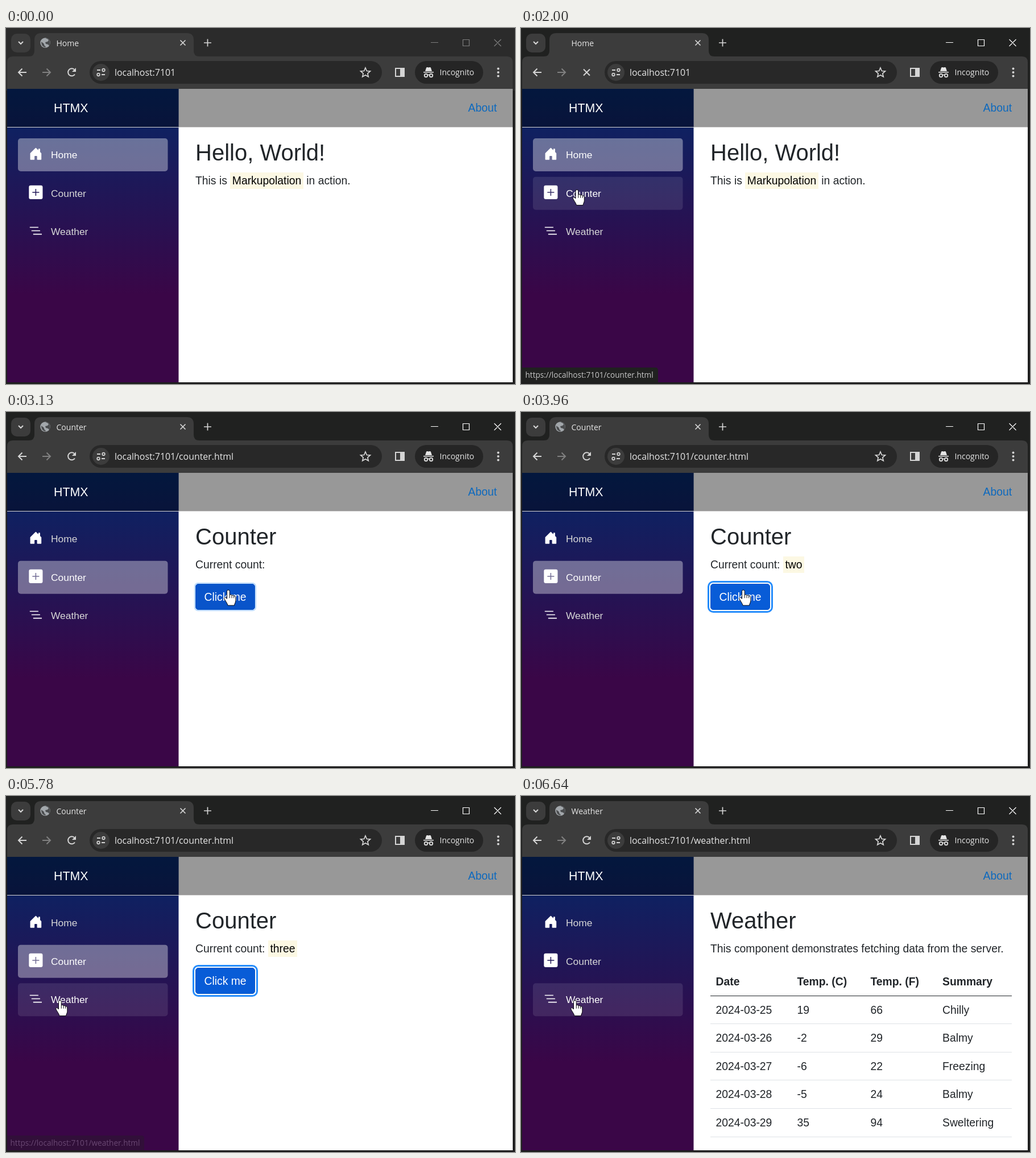
Recreate the animation shown at these times as an HTML page. Size 895 by 626 pixels, loop 8100 ms.

```html
<!DOCTYPE html>
<html lang="en">
<head>
<meta charset="utf-8">
<title>Browser demo</title>
<style>
html, body { margin: 0; width: 100%; height: 100%; overflow: hidden; background: #1e1e1e; }
#stage { position: absolute; left: 0; top: 0; width: 895px; height: 626px; overflow: hidden;
  font: 19.33px/29px "Liberation Sans", Arial, sans-serif; color: #212529; }
svg { position: absolute; left: 0; top: 0; }
.ui { font-family: "Open Sans", "Noto Sans", sans-serif; font-size: 14px; fill: #e6e6e6; }
.line { fill: none; stroke: #d5d5d5; stroke-width: 2; }
.thin { stroke-width: 1.7; }
.page { position: absolute; left: 333px; top: 195px; width: 530px; }
h1 { margin: 0 0 11px; font-weight: 400; font-size: 40px; line-height: 48px; }
p { margin: 0 0 19px; white-space: pre; }
mark { background: #fcf8e3; color: #000; padding: .1875em; }
#btn { display: inline-block; box-sizing: border-box; height: 46px; padding: 8px 14.5px;
  border: 1px solid; border-radius: 5px; color: #fff; white-space: pre; }
.row { position: relative; height: 48.6px; border-bottom: 1px solid #dee2e6; }
.row:first-child { border-color: #212529; font-weight: 700; }
.row span { position: absolute; top: 10px; white-space: pre; }
</style>
</head>
<body>
<div id="stage">
<svg width="895" height="626">
  <defs>
    <linearGradient id="side" x2="0" y2="1">
      <stop stop-color="#052767"/><stop offset=".7" stop-color="#3a0647"/>
    </linearGradient>
  </defs>
  <rect id="title" width="895" height="110"/>

  <!-- tab strip -->
  <rect x="9" y="10" width="34" height="33" rx="10" fill="#3c3c3c"/>
  <path d="M22 24l4 4 4-4" class="line"/>
  <path d="M40 50q10 0 10-10V21q0-12 12-12H318q12 0 12 12V40q0 10 10 10z" fill="#3c3c3c"/>
  <g id="globe">
    <circle cx="69" cy="26" r="8.7" fill="#a2a7ab"/>
    <path d="M62 24l5 4v2l3 3-1 1q-7-1-7-10zM69 19h4l2 3-2 2-4 1 1 3 4 1 2 2q3-5 0-10l-3-3z" fill="#4a4c4e"/>
  </g>
  <text id="tabText" class="ui" x="88.5" y="32"/>
  <path d="M306.5 21.5l9 9m0-9l-9 9M348 26h13M354.5 19.5v13" class="line thin"/>
  <path id="winBtns" d="M747 25.5h13M803.5 20.5h11v11h-11zM858.5 20l12 12m0-12l-12 12" fill="none" stroke-width="1.2"/>

  <!-- toolbar -->
  <path d="M2 107V60q0-10 10-10H881q10 0 10 10V107z" fill="#3c3c3c"/>
  <path d="M36 78H22m6.5-6.5L22 78l6.5 6.5" class="line"/>
  <path d="M64 78h14m-6.5-6.5L78 78l-6.5 6.5" class="line" style="stroke:#808080"/>
  <g id="reload">
    <path d="M121 81.5a6.5 6.5 0 1 1-1-8.5" class="line"/><path d="M123 70v7h-7z" fill="#d5d5d5"/>
  </g>
  <path id="stop" d="M110 72.5l11 11m0-11l-11 11" class="line"/>
  <rect x="147" y="58" width="514" height="40" rx="20" fill="#282828"/>
  <circle cx="167" cy="78" r="15" fill="#3c3c3c"/>
  <path d="M160 74h6M168 82h6" class="line"/>
  <circle cx="171.5" cy="74" r="2.3" class="line thin"/>
  <circle cx="162.5" cy="82" r="2.3" class="line thin"/>
  <text id="url" class="ui" x="191" y="83.5" style="font-size:15.9px"/>
  <path d="M632 70l2.4 5.5 6 .5-4.6 4 1.4 5.8-5.2-3.1-5.2 3.1 1.4-5.8-4.6-4 6-.5z" class="line thin"/>
  <path d="M685 71h15v14h-15z" class="line"/><path d="M693 71h7v14h-7z" fill="#d5d5d5"/>
  <rect x="719" y="58" width="120" height="40" rx="20" fill="#252525"/>
  <path d="M737 76l2-6q.5-1.500 2-1l2 .6 2-.6q1.500-.5 2 1l2 6zM734 77h18v1.600h-18z" fill="#e6e6e6"/>
  <path d="M741 83q2-1.500 4 0" class="line thin"/>
  <circle cx="738.5" cy="83.5" r="2.7" class="line"/><circle cx="747.5" cy="83.5" r="2.7" class="line"/>
  <text class="ui" x="762.5" y="83">Incognito</text>
  <g fill="#d5d5d5"><circle cx="865.5" cy="71.5" r="2"/><circle cx="865.5" cy="78" r="2"/><circle cx="865.5" cy="84.5" r="2"/></g>

  <!-- page frame -->
  <path d="M303 107H891V623H303z" fill="#fff"/>
  <path d="M303 107H891V174H303z" fill="#989898"/>
  <path d="M2 107H303.5V623H2z" fill="url(#side)"/>
  <path d="M2 107H303.5V174H2z" fill="#000" fill-opacity=".4"/>
  <path d="M2 174.5H891" stroke="#d6d5d5"/>
  <text x="84" y="148" font-size="21.3" fill="#fff">HTMX</text>
  <text x="812.5" y="147" fill="#0d69be">About</text>
  <g id="nav" font-size="17.4"></g>
  <g id="status">
    <path id="statusBox" fill="#202120"/>
    <text id="statusText" class="ui" x="7.5" y="615" style="font-size:13.6px;fill:#c7c7c7"/>
  </g>
</svg>

<div class="page" id="home"><h1>Hello, World!</h1><p>This is <mark>Markupolation</mark> in action.</p></div>
<div class="page" id="counter"><h1>Counter</h1><p>Current count: <mark id="count"></mark></p><div id="btn">Click me</div></div>
<div class="page" id="weather"><h1>Weather</h1><p>This component demonstrates fetching data from the server.</p><div id="table"></div></div>

<svg width="895" height="626">
  <g id="cursor" fill="#fff" stroke="#000" stroke-linejoin="round">
    <path id="arrow" d="M0 0V22.5L5 17.7 8.6 25.6 12.4 24 9 16.5H16Z"/>
    <g id="hand" transform="scale(.95)">
      <path d="M-2.6 16V2.4a2.5 2.5 0 0 1 5 0V9.5a2.2 2.2 0 0 1 4 .8 2.2 2.2 0 0 1 3.8 1 2.2 2.2 0 0 1 3.3 1.8V20c0 3-2 5-2.5 8.5H-1C-1.5 25-6.5 19-7.5 16c-.6-2.2 2-3 3.2-1.2z"/>
      <path d="M2.4 9.5v5.5M6.4 10.3v4.7M10.2 11.3v3.7" fill="none"/>
    </g>
  </g>
</svg>
</div>

<script>
const $ = id => document.getElementById(id);
const LOOP = 8100, STEP = 67.65;
const names = ["Home", "Counter", "Weather"];
const urls = ["", "/counter.html", "/weather.html"];
const pages = ["home", "counter", "weather"];
const icons = [
  "M6.5 14.5v-3.5q0-.5.5-.5h2q.5 0 .5.5v3.5a.5.5 0 0 0 .5.5h4a.5.5 0 0 0 .5-.5v-7a.5.5 0 0 0-.15-.35L13 5.8V2.5a.5.5 0 0 0-.5-.5h-1a.5.5 0 0 0-.5.5v1.3L8.35 1.15a.5.5 0 0 0-.7 0l-6 6a.5.5 0 0 0-.15.35v7a.5.5 0 0 0 .5.5h4a.5.5 0 0 0 .5-.5z",
  "M2 0H14a2 2 0 0 1 2 2V14a2 2 0 0 1-2 2H2a2 2 0 0 1-2-2V2a2 2 0 0 1 2-2zM7.5 4v3.5H4v1h3.5V12h1V8.5H12v-1H8.5V4z",
  "M1 3.5H11v1H1zM3 7.5H13v1H3zM5 11.5H15v1H5z"
];
$("nav").innerHTML = names.map((name, i) => `<g transform="translate(0 ${i * STEP})">
  <rect x="21" y="194" width="263.5" height="58" rx="5" fill="#fff"/>
  <path transform="translate(40.3 209.2) scale(1.51)" fill="#fff" fill-rule="evenodd" d="${icons[i]}"/>
  <text x="79" y="229">${name}</text></g>`).join("");
const rows = [...$("nav").children];

const forecast = `Date|Temp. (C)|Temp. (F)|Summary
2024-03-25|19|66|Chilly
2024-03-26|-2|29|Balmy
2024-03-27|-6|22|Freezing
2024-03-28|-5|24|Balmy
2024-03-29|35|94|Sweltering`;
const columns = [9.5, 152.5, 281.5, 408];
$("table").innerHTML = forecast.split("\n").map(line => `<div class="row">${
  line.split("|").map((cell, i) => `<span style="left:${columns[i]}px">${cell}</span>`).join("")}</div>`).join("");

// Pointer stops: time, x, y
const stops = [[960, -12, 342], [1320, 98.5, 284.5], [2200, 98.5, 284.5], [2500, 374, 308],
  [2630, 391, 313], [5160, 391, 313], [5700, 95, 359.5], [LOOP, 95, 359.5]];
const clicks = [3070, 3710, 4210];

const ramp = (t, start, end) => Math.max(0, Math.min(1, (t - start) / (end - start)));
const mix = (a, b, k) => a + (b - a) * k;
const mixRgb = (a, b, k) => `rgb(${a.map((v, i) => Math.round(mix(v, b[i], k)))})`;
const show = (id, on) => $(id).style.display = on ? "" : "none";
const text = (id, value) => { if ($(id).textContent !== value) $(id).textContent = value; };

function pointer(t) {
  const i = Math.max(1, stops.findIndex(s => s[0] > t));
  const [a, b] = [stops[i - 1], stops[i]];
  const u = ramp(t, a[0], b[0]), k = u * u * (3 - 2 * u);
  return [mix(a[1], b[1], k), mix(a[2], b[2], k)];
}

function rowAlpha(i, t, page, hover) {
  if (page === 1 && i === 1) return mix(.1, .37, ramp(t, 2390, 2590));
  if (page === 2 && i === 2) return mix(.37, .1, ramp(t, 6410, 6600));
  if (i === page) return .37;
  return hover === i && t >= 1860 ? .1 : 0;
}

function drawButton(t) {
  const press = Math.max(...clicks.map(c => ramp(t, c, c + 90) * (1 - ramp(t, c + 110, c + 240))));
  const over = ramp(t, 2490, 2640), focus = ramp(t, 3070, 3220);
  const base = [27, 110, 194].map((v, i) => mix(v, [8, 92, 215][i], over));
  $("btn").style.background = mixRgb(base, [10, 80, 196], press);
  $("btn").style.borderColor = mixRgb([24, 97, 172], [10, 88, 202], over);
  $("btn").style.boxShadow = `0 0 0 ${2 * focus}px #fff, 0 0 0 ${5 * focus}px rgba(37,140,251,${focus})`;
}

function draw(t) {
  const page = t < 2130 ? 0 : t < 6100 ? 1 : 2;
  const active = t >= 1860;
  const loading = t >= 1900 && t < 2130 || t >= 6000 && t < 6100;
  const [x, y] = pointer(t);
  const inRow = i => x > 21 && x < 284.5 && y > 194 + i * STEP && y < 252 + i * STEP;
  const hover = [0, 1, 2].findIndex(inRow);
  const overButton = page === 1 && x > 333 && x < 438 && y > 302 && y < 348;

  $("title").setAttribute("fill", active ? "#202120" : "#2b2b2b");
  $("winBtns").setAttribute("stroke", active ? "#fff" : "#7d7d7d");
  show("globe", !loading);
  show("reload", !loading);
  show("stop", loading);
  text("tabText", names[page]);
  text("url", "localhost:7101" + urls[page]);
  pages.forEach((id, i) => show(id, i === page));

  rows.forEach((row, i) => {
    row.children[0].setAttribute("fill-opacity", rowAlpha(i, t, page, hover));
    row.children[2].setAttribute("fill", i === page || i === hover ? "#fff" : "#d7d7d7");
  });

  const late = t > 4000;
  text("statusText", "https://localhost:7101" + urls[late ? 2 : 1]);
  $("statusBox").setAttribute("d", `M2 597H${late ? 238 : 236}q5 0 5 5V623H2z`);
  $("status").setAttribute("opacity", late
    ? ramp(t, 5720, 5900) * (1 - ramp(t, 6410, 6620))
    : ramp(t, 1480, 1590) * (1 - ramp(t, 2320, 2440)));

  const count = clicks.filter(c => t >= c + 80).length;
  text("count", ["", "one", "two", "three"][count]);
  show("count", count);
  drawButton(t);

  const pointing = hover >= 0 || overButton;
  show("cursor", t >= 1020);
  show("arrow", !pointing);
  show("hand", pointing);
  $("cursor").setAttribute("transform", `translate(${x} ${y})`);
}

function frame() {
  draw(performance.now() % LOOP);
  requestAnimationFrame(frame);
}
frame();
</script>
</body>
</html>
```
